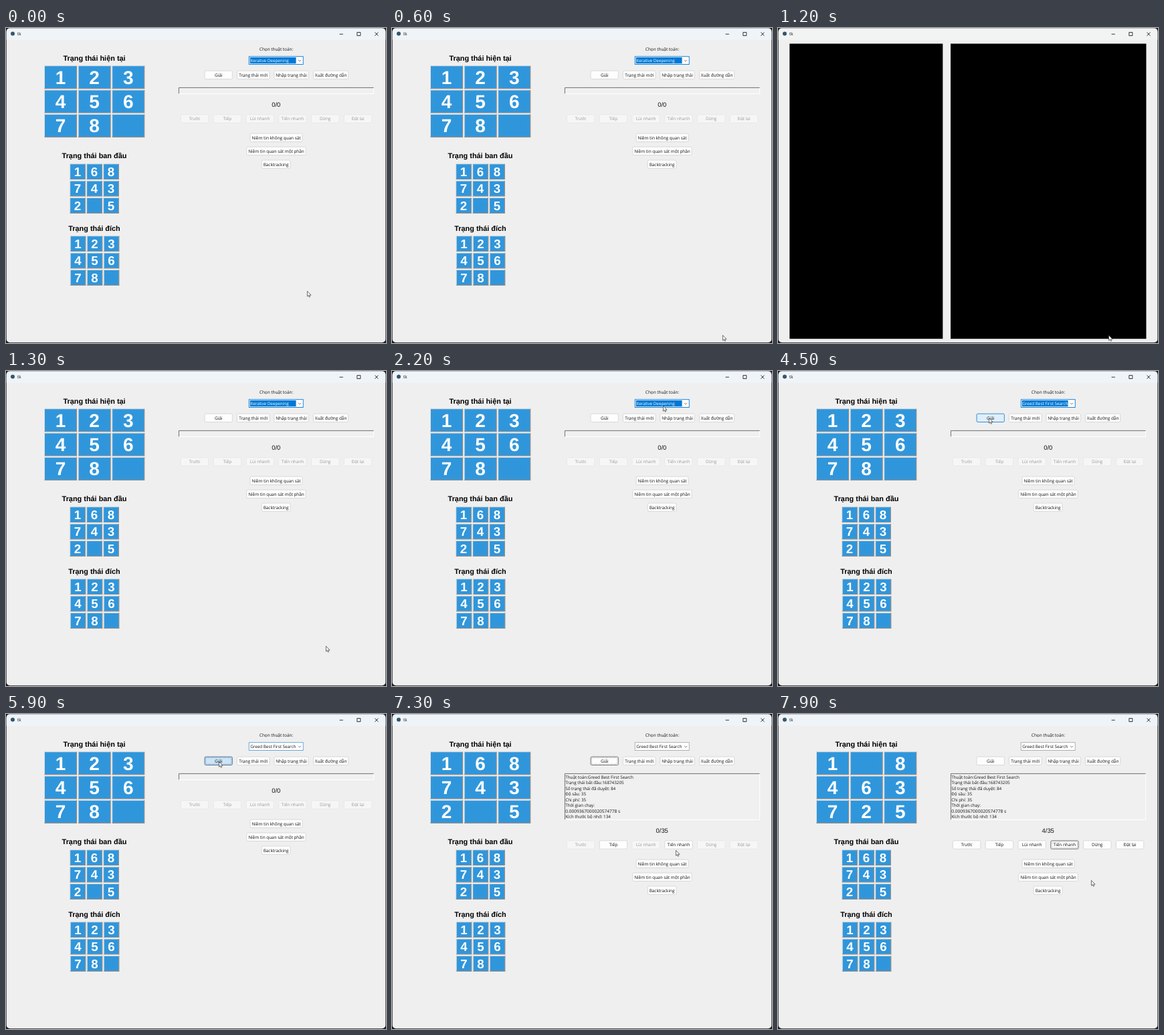
An HTML page that plays this animation: 568x472 px, repeating every 8000 ms.

```html
<!DOCTYPE html>
<html lang="vi">
<head>
<meta charset="utf-8">
<title>Puzzle solver</title>
<style>
  html, body { margin: 0; width: 568px; height: 472px; overflow: hidden; background: #1c1c1c; }
  svg { display: block; }
  text { font-family: "Open Sans", "Noto Sans", sans-serif; font-size: 6.4px; fill: #111; text-rendering: geometricPrecision; white-space: pre; }
  .mid { text-anchor: middle; }
  .arial { font-family: "Liberation Sans", Arial, sans-serif; }
  .head { font-weight: 700; font-size: 10.9px; fill: #000; }
  .big, .small { font-weight: 700; fill: #fff; }
  .big { font-size: 28px; }
  .small { font-size: 18.7px; }
  .count { font-size: 9.35px; }
</style>
</head>
<body>
<svg id="stage" width="568" height="472" viewBox="0 0 568 472"></svg>
<script>
const LOOP = 8000, STEP = 100;
const T = { blackout: 1200, redraw: 1300, pick: 3800, hover: 4400, press: 4900, blur: 5300, solved: 6000, leave: 6600, fast: 7500, play: 7600 };

// Pointer stops: time, x, y
const POINTER = [
  [0, 450, 394], [200, 450, 394], [400, 470, 423], [600, 494, 460], [1200, 494, 460],
  [1300, 478, 412], [1700, 430, 190], [2000, 407, 62], [2100, 405, 53], [2200, 405, 52],
  [2500, 422, 49], [2700, 422, 49], [3100, 398, 76], [3400, 385, 97], [3700, 384, 97],
  [4100, 352, 84], [4400, 316, 71], [4500, 315, 70], [4800, 315, 70], [5100, 318, 71],
  [6400, 318, 71], [6900, 372, 142], [7200, 420, 200], [7300, 424, 204], [7400, 424, 198],
  [7600, 427, 199], [7900, 468, 249], [8000, 468, 249]
];

const START = "168743205", GOAL = "123456780";
const MOVES = ["168743025", "168043725", "168403725", "108463725"];
const REPORT = [
  "Thuật toán:Greed Best First Search", "Trạng thái bắt đầu:" + START,
  "Số trạng thái đã duyệt: 84", "Độ sâu: 35", "Chi phí: 35",
  "Thời gian chạy:", "0.0009367000020574778 s", "Kích thước bộ nhớ: 134"
];

const LOOKS = {
  normal:  { fill: "#fdfdfd", edge: "#d2d2d2", ink: "#111" },
  off:     { fill: "#f6f6f6", edge: "#e6e6e6", ink: "#989898" },
  hover:   { fill: "#e0eef9", edge: "#0078d4", ink: "#111" },
  pressed: { fill: "#cce4f7", edge: "#245b8c", ink: "#111", ring: true },
  focus:   { fill: "#fdfdfd", edge: "#555", ink: "#111", ring: true }
};

const rect = (x, y, w, h, fill, extra = "") =>
  `<rect x="${x}" y="${y}" width="${w}" height="${h}" fill="${fill}" ${extra}/>`;
const path = (d, stroke, width = 1, fill = "none") =>
  `<path d="${d}" fill="${fill}" stroke="${stroke}" stroke-width="${width}"/>`;
const text = (x, y, s, cls = "", style = "") =>
  `<text x="${x}" y="${y}" class="${cls}" style="${style}">${s}</text>`;

function pointerAt(t) {
  const i = POINTER.findIndex(p => p[0] > t);
  const [t0, x0, y0] = POINTER[i - 1], [t1, x1, y1] = POINTER[i];
  const k = (t - t0) / (t1 - t0);
  return [x0 + (x1 - x0) * k, y0 + (y1 - y0) * k];
}

function pointer(t) {
  const [x, y] = pointerAt(t);
  return `<g transform="translate(${x} ${y})">` +
    path("M.4 .4V8.2L2.2 6.6L3.4 9.3L4.6 8.7L3.5 6.2H6Z", "#333", 0.7, "#fff") + "</g>";
}

function button(x, cy, w, label, look = "normal") {
  const { fill, edge, ink, ring } = LOOKS[look];
  const y = cy - 6.2, h = 12.4;
  let out = rect(x, y, w, h, fill, `rx="1.8" stroke="${edge}" stroke-width=".8"`);
  if (ring) out += rect(x + 1.6, y + 1.6, w - 3.2, h - 3.2, "none", 'stroke="#666" stroke-width=".5" stroke-dasharray=".6 .6"');
  return out + text(x + w / 2, cy + 2.3, label, "mid", `fill:${ink}`);
}

function tiles(board, x, y, dx, dy, w, h, cls, drop) {
  return [...board].map((n, i) => {
    const l = x + i % 3 * dx, t = y + Math.floor(i / 3) * dy, r = l + w, b = t + h;
    return rect(l, t, w, h, "#3096db") +
      path(`M${l} ${b}V${t}H${r}`, "#dcdcdc") +
      path(`M${r} ${t}V${b}H${l}`, "#8e8e8e", 1.2) +
      (n === "0" ? "" : text(l + w / 2, t + h / 2 + drop, n, cls + " arial mid"));
  }).join("");
}

function frame(black) {
  return rect(0.7, 0.5, 566.6, 470.8, "#efefef", 'rx="5"') +
    path("M.7 17.5V5.5Q.7 .5 5.7 .5H562.3Q567.3 .5 567.3 5.5V17.5Z", "none", 0, black ? "#f2f4f3" : "#eff4f9") +
    '<circle cx="10" cy="8.5" r="3" fill="#34566b"/>' +
    text(17, 11.2, "tk") +
    path("M498.5 9.2H503.8M524.8 6.5H529.8V11.5H524.8ZM551.3 6.5L556.5 11.7M556.5 6.5L551.3 11.7", "#222", 0.9);
}

function combo(t) {
  const focused = t < T.blur;
  const edge = focused ? "#0078d4" : t < T.solved ? "#5a9fd4" : "#a8a8a8";
  const label = t < T.pick ? "Iterative Deepening" : "Greed Best First Search";
  return rect(363.2, 42.7, 81, 11.8, "#fff", `stroke="${edge}" stroke-width=".9"`) +
    (focused ? rect(364.7, 44, 68.8, 9.2, "#0078d4") : "") +
    text(365.2, 50.9, label, "", `font-size:6.3px;fill:${focused ? "#fff" : "#111"}`) +
    path("M436.8 47.8L439 50L441.2 47.8", "#555", 0.7);
}

function left(t, step) {
  const board = step ? MOVES[step - 1] : t < T.solved ? GOAL : START;
  return text(132, 48.8, "Trạng thái hiện tại", "arial head mid") +
    tiles(board, 57.5, 56.7, 50.6, 36.3, 48, 34, "big", 10) +
    text(132, 195, "Trạng thái ban đầu", "arial head mid") +
    tiles(START, 95.7, 203.7, 25, 25.4, 22.6, 22.8, "small", 6.6) +
    text(132, 303.5, "Trạng thái đích", "arial head mid") +
    tiles(GOAL, 96.2, 311.7, 25, 25.4, 22.6, 22.8, "small", 6.6);
}

function right(t, step) {
  const solved = t >= T.solved, shift = solved ? 60 : 0, fast = t >= T.fast;
  const solveLook = t < T.hover || fast ? "normal" : t < T.press ? "hover" : t < T.solved ? "pressed" : "focus";
  const bottom = 98.5 + shift;
  let out = text(404, 34.3, "Chọn thuật toán:", "mid") + combo(t) +
    button(297, 70.3, 41.3, "Giải", solveLook) +
    button(345.3, 70.3, 48.7, "Trạng thái mới") +
    button(400.8, 70.3, 51.4, "Nhập trạng thái") +
    button(459.4, 70.3, 52.2, "Xuất đường dẫn") +
    rect(258, 89, 292, bottom - 89, "#f0f0f0") +
    path(`M258.4 ${bottom}V89.4H550`, "#6f6f6f") +
    path(`M549.6 89.5V${bottom}H258.5`, "#fff");
  if (solved) REPORT.forEach((line, i) => {
    out += text(259.2, 96.6 + i * 8.5, line, "", `font-size:${i === 6 ? 6.6 : 6.3}px`);
  });
  out += text(403.7, 117.6 + shift, `${step}/${solved ? 35 : 0}`, "arial count mid");

  const ready = solved ? [1, 3] : [];
  ["Trước", "Tiếp", "Lùi nhanh", "Tiến nhanh", "Dừng", "Đặt lại"].forEach((label, i) => {
    const look = fast ? (i === 3 ? "focus" : "normal") : ready.includes(i) ? "normal" : "off";
    out += button(261.3 + i * 48.8, 136 + shift, 41.4, label, look);
  });
  return out +
    button(365, 164.3 + shift, 78, "Niềm tin không quan sát") +
    button(359.7, 184.3 + shift, 88.5, "Niềm tin quan sát một phần") +
    button(382.2, 204.2 + shift, 42.8, "Backtracking");
}

function scene(t) {
  const black = t >= T.blackout && t < T.redraw;
  const step = t < T.play ? 0 : Math.min(MOVES.length, 1 + Math.floor((t - T.play) / STEP));
  const body = black
    ? rect(17.3, 23.5, 229, 442.2, "#000") + rect(258, 23.5, 292.4, 442.2, "#000")
    : left(t, step) + right(t, step);
  return frame(black) + body + pointer(t);
}

const stage = document.getElementById("stage");
const begin = performance.now();
let shown = -1;
function draw() {
  const t = Math.floor((performance.now() - begin) % LOOP / STEP) * STEP;
  if (t !== shown) stage.innerHTML = scene(shown = t);
  requestAnimationFrame(draw);
}
draw();
</script>
</body>
</html>
```
